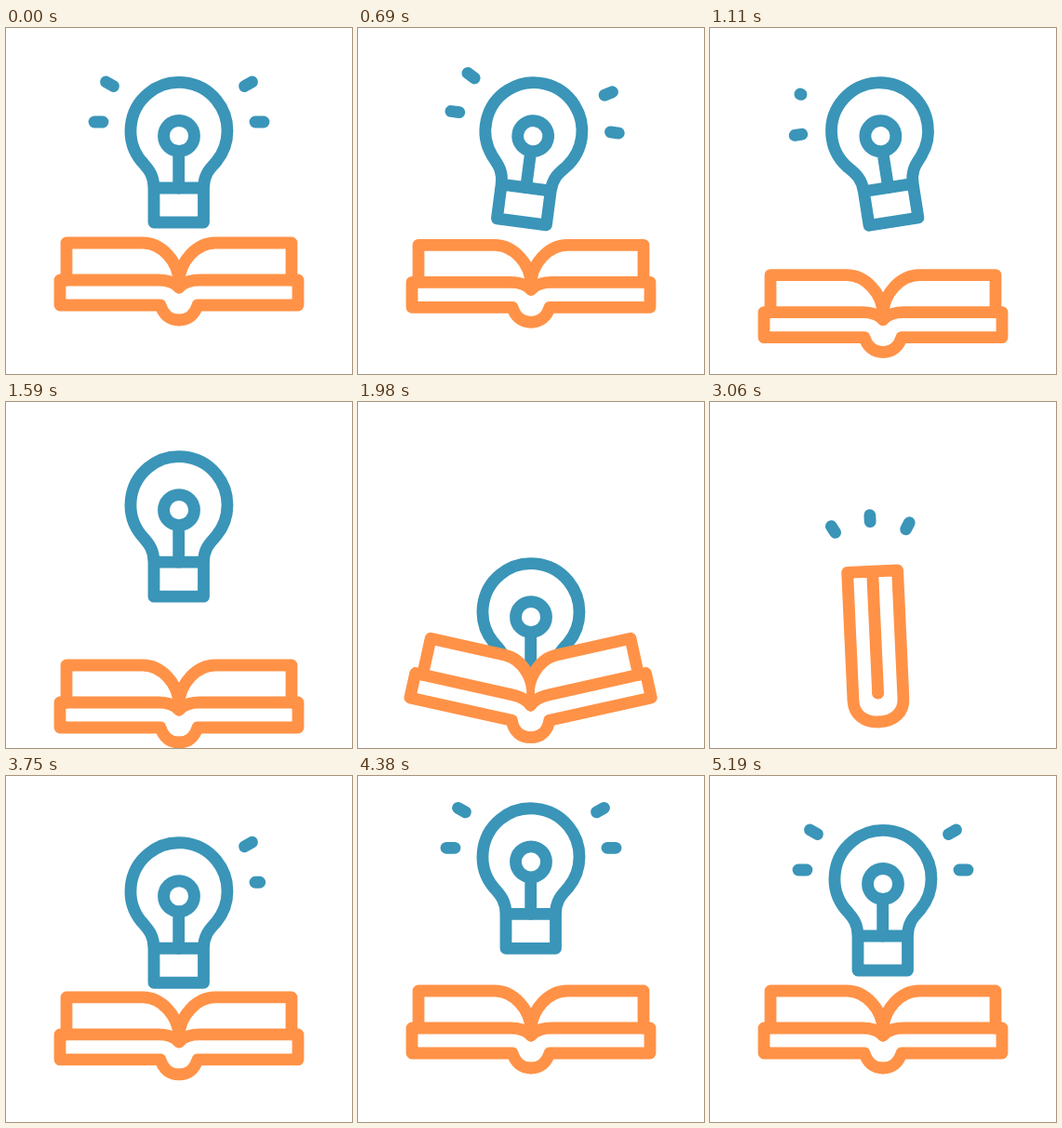
These frames come from a looping animation (372 px wide and 372 px high, 5.4 s). An HTML page with a canvas:

```html
<!DOCTYPE html>
<html lang="en">
<head>
<meta charset="utf-8">
<title>Book and bulb</title>
<style>
  html, body { margin: 0; width: 100%; height: 100%; overflow: hidden; background: #fff; }
  canvas { display: block; width: 372px; height: 372px; }
</style>
</head>
<body>
<canvas id="stage" width="372" height="372"></canvas>
<script>
const ctx = document.getElementById('stage').getContext('2d');
const LOOP = 5400, BLUE = '#3a95b8', ORANGE = '#ff9247';
const CX = 186, PIVOT_Y = 133, BASE_Y = 209;

const lerp = (a, b, k) => a + (b - a) * k;
const rad = deg => deg * Math.PI / 180;
const linear = k => k;
const sine = k => (1 - Math.cos(Math.PI * k)) / 2;
const cubicIn = k => k ** 3;
const cubicOut = k => 1 - (1 - k) ** 3;

// Eased progress from 0 to 1 between two times.
const go = (t, from, to, ease = sine) =>
  ease(Math.max(0, Math.min(1, (t - from) / (to - from))));

function bulbPose(t) {
  return {
    y: 290 * go(t, 1540, 2140, cubicIn) - 60 * go(t, 2200, 2300)
       - 261 * go(t, 3175, 4465, cubicOut) + 31 * go(t, 4150, 4870),
    tilt: 9 * go(t, 0, 585) - 18 * go(t, 585, 1140) + 9 * go(t, 1140, 1540),
    scale: t < 2200 ? 1 : go(t, 3175, 3400)
  };
}

function bookPose(t) {
  const close = go(t, 1860, 2357), right = go(t, 2290, 2760);
  const left = go(t, 2830, 3170), back = go(t, 3170, 3400);
  return {
    x: CX - 3 * close + 3 * right - 7 * left + 7 * back,
    y: 279 + 52 * go(t, 570, 1460) - 25 * go(t, 1850, 2300)
       + 11 * go(t, 2850, 3210) - 38 * go(t, 3235, 4430, cubicOut),
    tilt: 8.5 * right - 14.5 * left + 6 * back,
    fold: close - go(t, 3120, 3420)
  };
}

function pen(color) {
  ctx.strokeStyle = color;
  ctx.lineWidth = 12.8;
  ctx.lineCap = ctx.lineJoin = 'round';
}

// Draws the part of a ray between two fractions of its length.
function ray(x1, y1, x2, y2, from, to) {
  if (to - from < 0.02) return;
  ctx.beginPath();
  ctx.moveTo(lerp(x1, x2, from), lerp(y1, y2, from));
  ctx.lineTo(lerp(x1, x2, to), lerp(y1, y2, to));
  ctx.stroke();
}

// Geometry of the left half, measured from the spine; k is 0 open, 1 closed.
function leaf(k) {
  const s = Math.sin(rad(90 * k)), c = Math.cos(rad(90 * k));
  const len = 128 + 3 * k;
  return {
    k, len,
    p: (u, h) => [-u * c + h * s, -u * s - h * c],
    base: lerp(8, 0, k),
    page: len - lerp(7, 14, k)
  };
}

function drawHalf({ k, p, base, len, page }) {
  const mix = (a, b, c, d) => [lerp(a, c, k), lerp(b, d, k)];
  ctx.save();
  ctx.beginPath();
  ctx.rect(-400, -400, 400.5, 800);
  ctx.clip();

  // Cover and rounded spine
  ctx.beginPath();
  ctx.moveTo(0, 0);
  ctx.quadraticCurveTo(...p(7, base), ...p(22, base));
  ctx.lineTo(...p(len, base));
  ctx.lineTo(...p(len, base - 27));
  ctx.lineTo(...p(lerp(20, -7, k), base - 27));
  ctx.bezierCurveTo(...mix(-17, 29, -27, 22), ...mix(-10, 35, -16, 31), ...mix(0, 35, 0, 31));
  ctx.stroke();

  // Pages
  ctx.beginPath();
  ctx.moveTo(...p(page, base));
  ctx.lineTo(...p(page, base + 40));
  ctx.lineTo(...p(39, base + 40));
  ctx.bezierCurveTo(...p(19, base + 40), ...p(0, base + 20), ...p(0, 5));
  ctx.lineTo(0, 0);
  ctx.stroke();
  ctx.restore();
}

function drawBook(t) {
  const { x, y, tilt, fold } = bookPose(t), half = leaf(fold);
  ctx.save();
  ctx.translate(x, y);
  ctx.rotate(rad(tilt));
  pen(ORANGE);
  drawHalf(half);
  ctx.scale(-1, 1);
  drawHalf(half);

  pen(BLUE);
  for (const side of [-1, 0, 1]) {
    const drop = 10 * Math.abs(side);
    ray(38 * side, drop - 184.5, 42 * side, drop - 191.5,
        go(t, 3090, 3220, linear), go(t, 2520, 2670, linear));
  }
  ctx.restore();
}

// Keeps the bulb above the open pages.
function clipToPages(t) {
  const { x, y, fold } = bookPose(t), { p, base, page } = leaf(fold);
  const [cx, cy] = p(page, base + 40), [bx, by] = p(39, base + 40), [lx, ly] = p(0, base + 24);
  ctx.beginPath();
  ctx.moveTo(x - 300, y - 400);
  ctx.lineTo(x + cx, y + cy);
  ctx.lineTo(x + bx, y + by);
  ctx.quadraticCurveTo(x + lx, y + ly, x, y);
  ctx.quadraticCurveTo(x - lx, y + ly, x - bx, y + by);
  ctx.lineTo(x - cx, y + cy);
  ctx.lineTo(x + 300, y - 400);
  ctx.clip();
}

// Right rays come and go first, then the left ones.
function drawBulbRays(t) {
  for (let i = 0; i < 4; i++) {
    const side = i < 2 ? 1 : -1, flat = i % 2;
    const from = go(t, 695 + 130 * i, 875 + 130 * i, linear);
    const back = go(t, 3500 + 130 * i, 3730 + 130 * i, linear);
    const [x1, y1, x2, y2] = flat ? [82, 101, 91, 101] : [70.5, 62.5, 78.5, 58];
    ray(CX + side * x1, y1, CX + side * x2, y2, t < 2200 ? from : 0, t < 2200 ? 1 : back);
  }
}

function drawBulb(t) {
  const { y, tilt, scale } = bulbPose(t);
  if (scale < 0.01 || (t > 2140 && t < 2200)) return;
  ctx.save();
  if (t > 1600 && t < 3700) clipToPages(t);
  ctx.translate(CX, BASE_Y + y);
  ctx.scale(scale, scale);
  ctx.translate(0, PIVOT_Y - BASE_Y);
  ctx.rotate(rad(tilt));
  ctx.translate(-CX, -PIVOT_Y);
  pen(BLUE);

  // Glass and base
  ctx.beginPath();
  ctx.moveTo(159, 172);
  ctx.bezierCurveTo(159, 156, 151, 150, 146, 143.5);
  ctx.arc(CX, 110.5, 52, rad(140.5), rad(39.5));
  ctx.bezierCurveTo(221, 150, 212.5, 156, 212.5, 172);
  ctx.rect(159, 172, 53.5, 37);
  ctx.stroke();

  // Filament
  ctx.beginPath();
  ctx.arc(CX, 116, 16.5, 0, 2 * Math.PI);
  ctx.moveTo(CX - 0.3, 134);
  ctx.lineTo(CX - 0.3, 172);
  ctx.stroke();

  drawBulbRays(t);
  ctx.restore();
}

const start = performance.now();
function frame() {
  const t = (performance.now() - start) % LOOP;
  ctx.fillStyle = '#fff';
  ctx.fillRect(0, 0, 372, 372);
  drawBulb(t);
  drawBook(t);
  requestAnimationFrame(frame);
}
frame();
</script>
</body>
</html>
```
